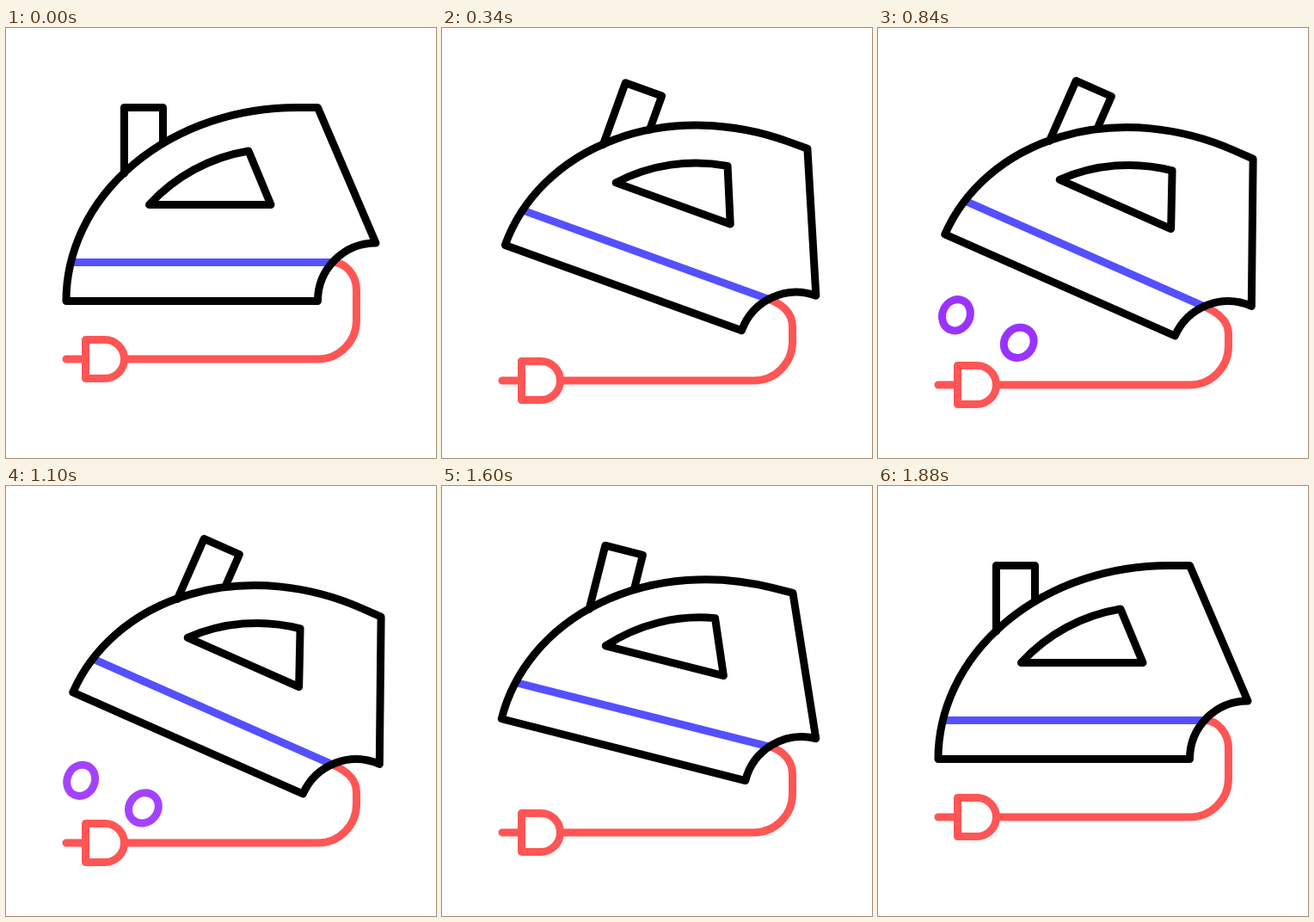
Write an HTML page that moves like this. It is 500x500 px and loops after 2000 ms.

```html
<!DOCTYPE html>
<html lang="en">
<head>
<meta charset="utf-8">
<title>Iron</title>
<style>
html, body { margin: 0; width: 100%; height: 100%; overflow: hidden; background: #fff; }
svg { display: block; width: 100vw; height: 100vh; fill: none; stroke-width: 9; stroke-linecap: round; stroke-linejoin: round; }
</style>
</head>
<body>
<svg viewBox="0 0 500 500">
  <g stroke="#ff5555">
    <path id="cord"/>
    <path id="plug" d="M70 385H92.5M92.5 362.5H115A22.5 22.5 0 0 1 115 407.5H92.5Z"/>
  </g>
  <g id="iron" stroke="#000">
    <path d="M76 272.5H380" stroke="#5550ff" stroke-linecap="butt"/>
    <path d="M70 317.5H362.5A67.5 67.5 0 0 1 430 250L362.5 92.5H338A268 225 0 0 0 70 317.5Z"/>
    <path d="M137.5 169V92.5H182.5V134"/>
    <path d="M166.5 205.5H308L282 143A200 200 0 0 0 166.5 205.5Z"/>
  </g>
  <g id="drops" stroke="#9b33ff">
    <ellipse rx="16" ry="18.5"/>
    <ellipse rx="16.5" ry="18.5"/>
  </g>
</svg>
<script>
const $ = id => document.getElementById(id);
const LOOP = 2000, SWING = 490, DOWN = 1380, TILT = 23.8, LIFT = 30;
const PIVOT = [329, 282];
const DROPS = [[50, 24], [129.5, 42]]; // place along the plate, own tilt
const clamp = x => Math.min(1, Math.max(0, x));

// cubic-bezier(.5, 0, .5, 1)
function ease(x) {
  let lo = 0, hi = 1, s = .5;
  for (let i = 0; i < 24; i++) {
    s = (lo + hi) / 2;
    if (1.5 * s * (1 - s) + s ** 3 < x) lo = s; else hi = s;
  }
  return s * s * (3 - 2 * s);
}

function onIron(x, y, angle, drop) {
  const a = angle * Math.PI / 180, c = Math.cos(a), s = Math.sin(a);
  const dx = x - PIVOT[0], dy = y - PIVOT[1];
  return [PIVOT[0] + dx * c - dy * s, PIVOT[1] + dx * s + dy * c + drop, c, s];
}

function draw(t) {
  const p = ease(clamp(t / SWING)) - ease(clamp((t - DOWN) / SWING));
  const angle = TILT * p, drop = LIFT * p;
  $('iron').setAttribute('transform', `translate(0 ${drop}) rotate(${angle} ${PIVOT})`);
  $('plug').setAttribute('transform', `translate(0 ${drop})`);

  const [x, y, c, s] = onIron(380, 272.5, angle, drop);
  const end = y + 32;
  $('cord').setAttribute('d', `M${x} ${y}C${x + 15 * c} ${y + 15 * s} 407.5 ${end - 17} 407.5 ${end}` +
    `V${340 + drop}A45 45 0 0 1 362.5 ${385 + drop}H137.5`);

  const u = (t - 500) / 720;
  const on = u > 0 && u < 1;
  $('drops').setAttribute('visibility', on ? 'visible' : 'hidden');
  if (!on) return;
  const fall = 90 * (1 - (1 - u) ** 3.5);
  const size = 1 - (1 - clamp(u / .3)) ** 2;
  $('drops').setAttribute('opacity', clamp((1 - u) / .18));
  DROPS.forEach(([along, tilt], i) => {
    const [dx, dy] = onIron(70 + along, 317.5 + fall, TILT, LIFT);
    $('drops').children[i].setAttribute('transform', `translate(${dx} ${dy}) rotate(${tilt}) scale(${size})`);
  });
}

function tick() {
  draw(performance.now() % LOOP);
  requestAnimationFrame(tick);
}
draw(0);
tick();
</script>
</body>
</html>
```
